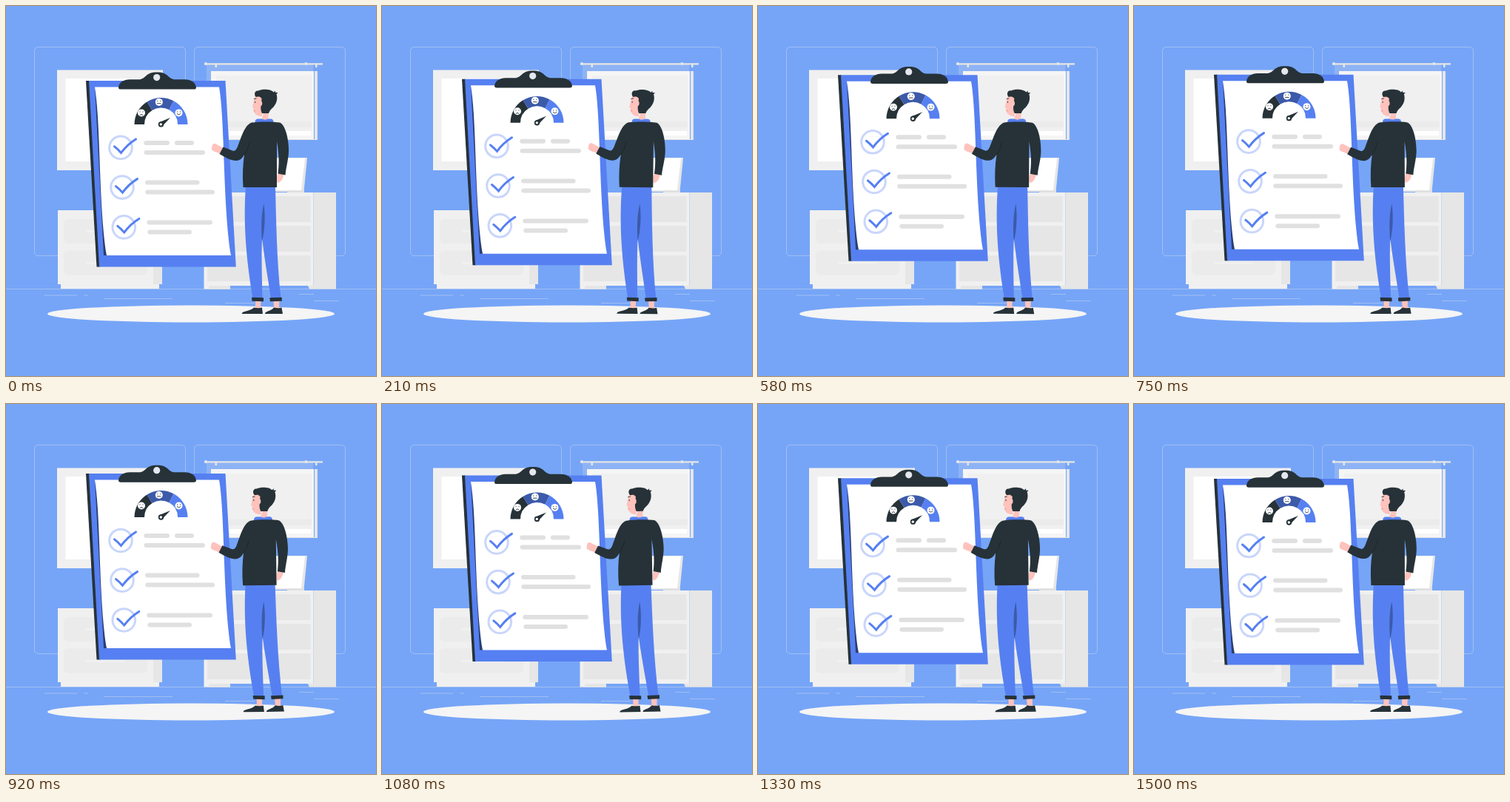
These frames come from a looping animation (500 px wide and 500 px high, 1540 ms). An HTML page:

```html
<!DOCTYPE html>
<html lang="en">
<head>
<meta charset="utf-8">
<title>Checklist</title>
<style>
  html, body { margin: 0; width: 100%; height: 100%; overflow: hidden; background: #76a5f7; }
  svg { display: block; width: 100vw; height: 100vh; }
  .blue { fill: #5680f1; }
  .navy { fill: #3c5aa9; }
  .dark { fill: #263238; }
  .skin { fill: #ffc2bc; }
  .g1 { fill: #f5f5f5; }
  .g2 { fill: #f0f0f0; }
  .g3 { fill: #e6e6e6; }
  .g4 { fill: #e0e0e0; }
  .white { fill: #fff; }
  .thin { fill: none; stroke: #ebebeb; stroke-width: .5; opacity: .75; }
  .ink { fill: none; stroke: #263238; stroke-width: .9; stroke-linecap: round; }
</style>
</head>
<body>
<svg viewBox="0 0 500 500">
  <defs>
    <g id="face">
      <circle class="white" r="5"/>
      <path class="ink" d="M-2-1.6v.4M2-1.6v.4"/>
    </g>
    <g id="check" fill="none" stroke-width="3">
      <circle cx="155" cy="191.5" r="15.3" stroke="#c9d6fb"/>
      <path d="M146.5 190Q151 193.500 155.500 198.500Q164 187 175.500 180" stroke="#5680f1" stroke-linecap="round"/>
    </g>
  </defs>

  <g id="room">
    <g class="thin">
      <rect x="38.500" y="55.500" width="204" height="282" rx="5"/>
      <rect x="254.500" y="55.500" width="204" height="282" rx="5"/>
      <path d="M0 382.500H500M52 391H96M105 391H111M132 395.500H225M396 389.500H416M416 398.500H450M296 401.500H336"/>
    </g>

    <path class="g2" d="M69 86.500H212V222H69Z"/>
    <path class="white" d="M80.500 98H200V210H80.500Z"/>

    <path class="g2" d="M70 276H199V376H70ZM74 376H207V382H74Z"/>
    <path class="g3" d="M199 276H211V376H199Z"/>
    <g fill="#ebebeb">
      <rect x="78" y="288" width="113" height="33" rx="6"/>
      <rect x="78" y="330.500" width="113" height="33" rx="6"/>
    </g>
    <path class="g2" d="M108 302.500H161V306H108ZM108 345.500H161V349H108Z"/>

    <path fill="#8eb3f5" d="M271 79H415V180H271Z"/>
    <path class="g3" d="M268 77.300H428V79.500H268ZM282.500 79H285V83H282.500ZM418 79H420.500V83H418Z"/>
    <circle class="g3" cx="270" cy="78" r="2"/>
    <circle class="g3" cx="405.500" cy="78" r="2"/>
    <path class="g1" d="M277 88H416V181H277Z"/>
    <path class="g3" d="M417 88H421V181H277V180H417Z"/>
    <path class="g2" d="M284 94H413V169H284Z"/>
    <path fill="#ebebeb" d="M284 156H413V164H284Z"/>
    <path class="white" d="M284 169H412V175H284Z"/>

    <path class="g3" d="M365 205H407L402.500 251H362Z"/>
    <path class="white" d="M362 205.500H404L399 249H358Z"/>
    <path class="g4" d="M380 249.500H403V252H380Z"/>

    <path class="g2" d="M267.500 252H415.500V378H410L408 378H303V382.500H267.500Z"/>
    <path class="g3" d="M415.500 252H446V382.500H410L408 378H415.500ZM272 257H411.500V292H272ZM272 297H411.500V332H272ZM272 337H411.500V372H272ZM275 378H303V382.500H273Z"/>
  </g>

  <ellipse class="g1" cx="250" cy="416" rx="194" ry="11.500"/>

  <g id="board">
    <path class="dark" d="M108 101H113L127 352.500H122.500Z"/>
    <path class="blue" d="M112 101H296.500L310.800 352.500H126Z"/>
    <path fill="#2a3f70" d="M120 109.500L132 337H137L130 200Z"/>
    <path class="white" d="M120 109.500H288C296 155 293 270 304 337H136C125 270 128 155 120 109.500Z"/>
    <path class="dark" d="M152 110C153 103 159 99.500 167 99.300H181C190 98 188 89.700 204 89.700S218 98 227 99.300H242C250 99.500 256 103 257 110Q257 112.700 254 112.700H155Q152 112.700 152 110Z"/>
    <circle cx="203.700" cy="96.700" r="4.600" fill="#e4e7ee"/>

    <g transform="translate(209.5 160)">
      <path class="dark" d="M-36 0A36 36 0 0 1-19-30.500L-12-19A22.500 22.500 0 0 0-22.500 0Z"/>
      <path class="navy" d="M-19-30.500A36 36 0 0 1 17-31.700L11-19.600A22.500 22.500 0 0 0-12-19Z"/>
      <path class="blue" d="M17-31.700A36 36 0 0 1 36 0H22.500A22.500 22.500 0 0 0 11-19.600Z"/>
      <use href="#face" x="-26.500" y="-15.500"/>
      <use href="#face" x="-2.700" y="-30"/>
      <use href="#face" x="24" y="-15.500"/>
      <path class="ink" d="M-28.500-12.500Q-26.500-15-24.500-12.500M-5-28.200H-.4M21.700-14.500Q24-11.500 26.300-14.500"/>
      <path class="dark" d="M-2-3L12.500-9L2 2Z"/>
      <circle class="dark" r="3.700"/>
      <circle class="white" cx="-.2" r="1.700"/>
    </g>

    <use href="#check"/>
    <use href="#check" x="2" y="53.700"/>
    <use href="#check" x="4.300" y="107.500"/>
    <path fill="none" stroke="#e0e0e0" stroke-width="6" stroke-linecap="round" d="M189.300 185H218M231 185H251M189.500 198H266M191 238.600H258.500M191.300 251.600H279M193.300 292.600H276M194.300 305.600H248"/>
  </g>

  <g id="man">
    <path class="skin" d="M337 398H344.500L344 409H337ZM361.500 398H369.500L369 409H362Z"/>
    <path class="dark" d="M319 416C318 412 330 413 335 407.500Q341 409 346 407.500L347 416ZM350 416C350 412 358 413 362 407.500Q368 409 372.500 407.500L374 416Z"/>
    <path class="blue" d="M324 243H364C365 290 366 345 371.500 395H358C354 368 349 340 346 314C345 340 346 370 346.500 395H333.500C326 350 320 300 324 243Z"/>
    <path class="navy" d="M348.500 267C345 280 344.500 300 346 318C350 302 350.500 284 348.500 267Z"/>
    <path class="dark" d="M332 393.800L348 394.300V399.200L332.500 398.700ZM356.300 394.300L372.800 393.800V398.700L357 399.200Z"/>

    <path class="skin" d="M368 226L375 227C375 233 372 238 367 239C366 235 365.500 231 368 226ZM294 192L283 186.200C279.500 185 278 188 278 194C281 197.500 286 197.500 290 200Z"/>
    <path class="blue" d="M336.500 158Q336 153 340 152.500H358Q362 153 361.500 158Z"/>
    <path class="dark" d="M332 157.500C342 156 361 156 370 157.500C378 161 382 181 382 195C382 207 378.500 217 377.500 228.500L367.500 226.500C369 215 369.500 204 366 183V245H320.500C319.500 229 320 215 322 201C319 206 316 209 311 209C304 209 297 205 288.500 200L293.500 190.500L306 195.500C309 196.500 311 195 313 190C318 178 322 161 332 157.500Z"/>
    <path fill="none" stroke="#1b2429" stroke-width=".8" d="M329.500 184Q327 194 322 201"/>

    <path class="skin" d="M346 141H355L354.500 152Q350 155 346 152.500ZM337 121C334.500 127 334.500 131 332.800 136.500L334.300 138C334.500 145 338 149.500 347 149L352 124Z"/>
    <path class="dark" d="M338 123C334.500 120 336 113.500 341 114.500C346 112 358 112 361.500 116.500L364 114.500L363.700 116.800L367.500 117L365.500 119C367.500 126 365.500 132 361 137C357.500 140 356 142 355 145H346C344.500 142 344 139 344.500 134L345.500 125C343 122 341 122.500 338 123Z"/>
    <ellipse class="skin" cx="343.600" cy="131.500" rx="2.600" ry="3.800"/>
    <path class="ink" d="M335.300 125.500L338 125M336.700 129.200V130.600"/>
    <path d="M334.600 141.500L337 142" stroke="#e38f8a" stroke-width=".9"/>
  </g>
</svg>
<script>
  const LOOP = 1540;
  const board = document.getElementById('board');
  const man = document.getElementById('man');
  const wave = (time, peak) => Math.cos(2 * Math.PI * (time - peak) / LOOP);
  const restTilt = wave(0, 1110);

  function draw(now) {
    const time = now % LOOP;
    const lift = 4.2 * (1 + wave(time, 720));
    const tilt = 0.86 * (restTilt - wave(time, 1110));
    board.setAttribute('transform', `translate(0 ${-lift})`);
    man.setAttribute('transform', `rotate(${tilt} 345 272)`);
    requestAnimationFrame(draw);
  }
  draw(performance.now());
</script>
</body>
</html>
```
